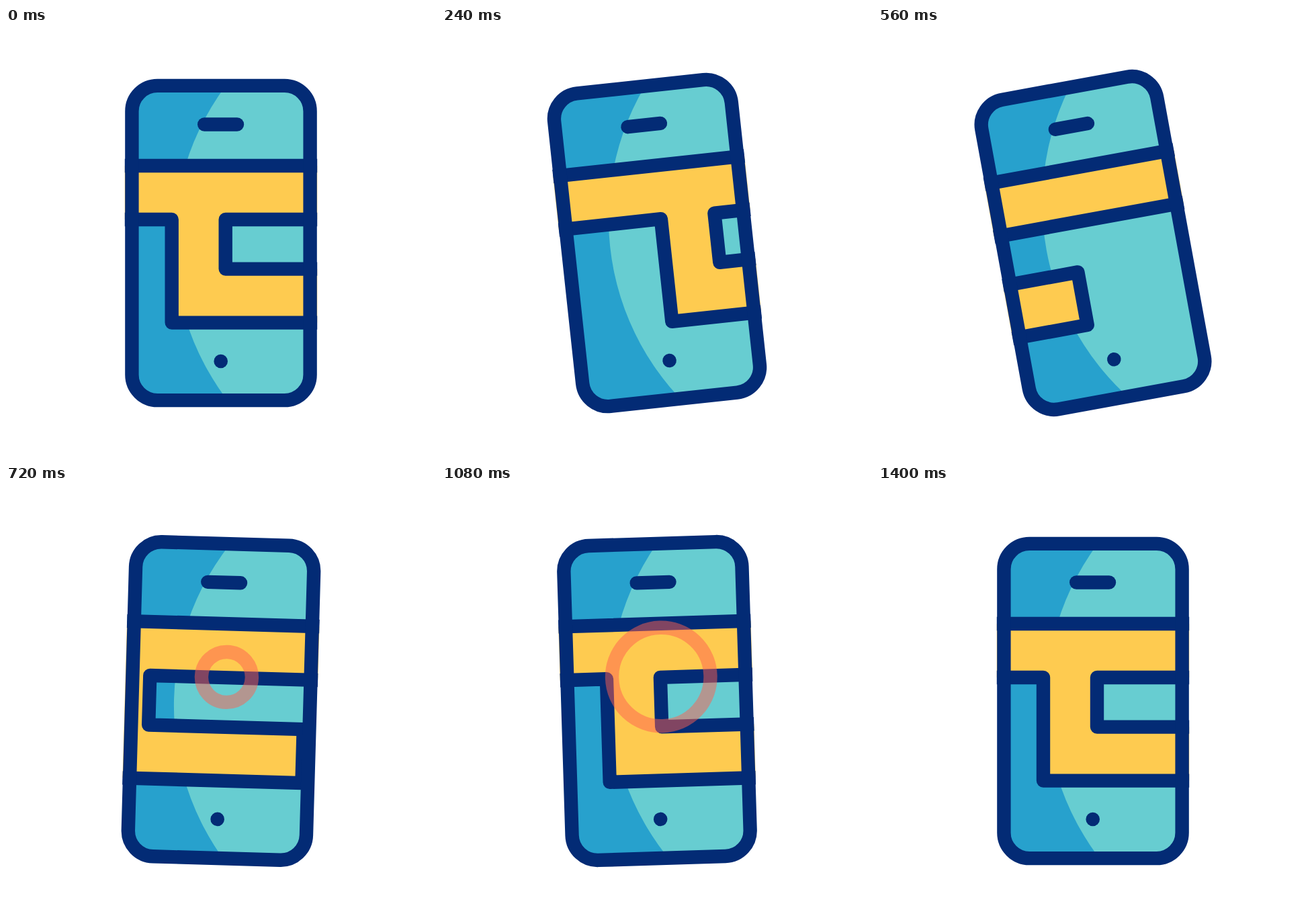
An HTML page for the animation above (2 s loop, 640 px wide and 640 px high).

```html
<!DOCTYPE html>
<html lang="en">
<head>
<meta charset="utf-8">
<title>Phone maze</title>
<style>
  html, body { margin: 0; width: 100%; height: 100%; overflow: hidden; background: #fff; }
  svg { display: block; width: 100%; height: 100%; }
  .line { stroke: #032b75; stroke-width: 20.4; stroke-linecap: round; stroke-linejoin: round; }
</style>
</head>
<body>
<svg viewBox="0 0 640 640">
  <defs>
    <clipPath id="body"><rect x="187.4" y="85.9" width="265.2" height="468.2" rx="38"/></clipPath>
    <clipPath id="screen"><rect x="176.8" y="100" width="286.4" height="440"/></clipPath>
  </defs>
  <g id="phone">
    <g clip-path="url(#body)">
      <rect x="180" y="80" width="280" height="480" fill="#27a1cd"/>
      <circle cx="639" cy="318.3" r="389" fill="#67cdd1"/>
    </g>
    <g clip-path="url(#screen)"><path id="maze" class="line" fill="#fecb50"/></g>
    <rect class="line" x="187.4" y="85.9" width="265.2" height="468.2" rx="38" fill="none"/>
    <path class="line" d="M295.2 143.5H344"/>
    <circle cx="319.7" cy="496" r="10.3" fill="#032b75"/>
    <circle id="ring" cx="327.4" cy="284.2" fill="none" stroke="#ff6150" stroke-width="20.4"/>
  </g>
</svg>
<script>
const LOOP = 2000, STEP = 40, PERIOD = 666;
const [phone, maze, ring] = ['phone', 'maze', 'ring'].map(id => document.getElementById(id));
const swing = [[0, 0], [480, -12.3], [840, 6], [1160, -3], [1400, 0]];

const clamp = v => Math.min(1, Math.max(0, v));
const progress = (t, from, to) => clamp((t - from) / (to - from));

// cubic-bezier(.4, 0, .6, 1)
function ease(x) {
  let lo = 0, hi = 1, u = .5;
  for (let i = 0; i < 24; i++) {
    const v = 1 - u;
    if (1.2 * v * v * u + 1.8 * v * u * u + u * u * u < x) lo = u; else hi = u;
    u = (lo + hi) / 2;
  }
  return x <= 0 ? 0 : x >= 1 ? 1 : u * u * (3 - 2 * u);
}

function angleAt(t) {
  const i = swing.findIndex(([time]) => time > t);
  if (i < 0) return 0;
  const [t0, a0] = swing[i - 1], [t1, a1] = swing[i];
  return a0 + (a1 - a0) * ease(progress(t, t0, t1));
}

// One passage of the maze, traced from right to left along its lower edge
const passage = x => `H${x + 326.7}V358.6H${x + 557.3}V438.6H${x + 246.7}V285`;

function draw(now) {
  const t = Math.floor((now % LOOP + 3) / STEP) * STEP % LOOP;
  const shift = (PERIOD - .7) * ease(progress(t, 0, 1000));
  phone.setAttribute('transform', `rotate(${angleAt(t)} 320 320)`);
  maze.setAttribute('d', `M-2000 205H2000V285${passage(shift)}${passage(shift - PERIOD)}H-2000Z`);
  ring.setAttribute('r', 34.4 + 51 * ease(progress(t, 600, 1320)));
  ring.setAttribute('opacity', progress(t, 640, 800) - progress(t, 1000, 1160));
  requestAnimationFrame(draw);
}
draw(performance.now());
</script>
</body>
</html>
```
